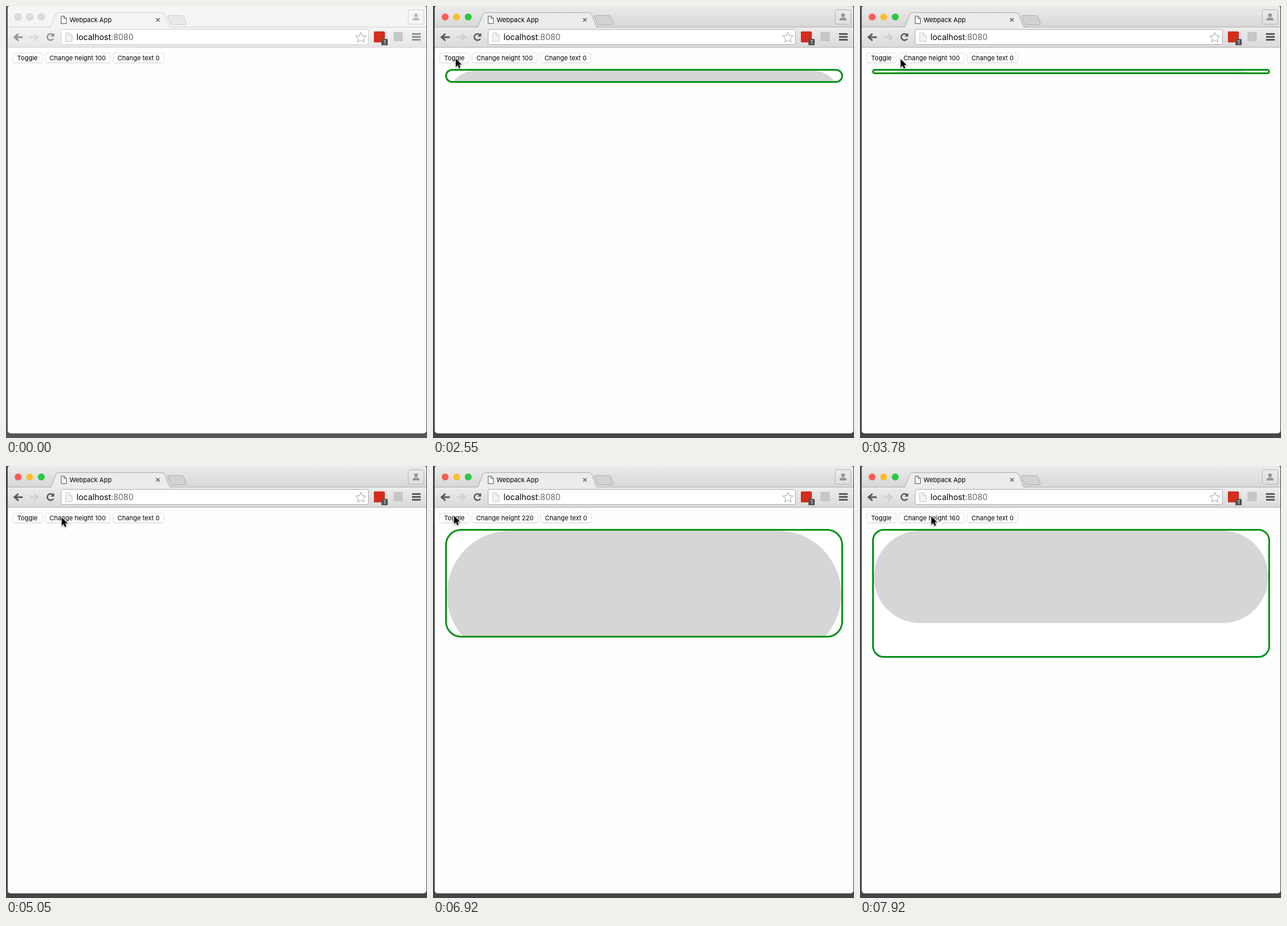
Animation, 729 px wide and 748 px high, one loop 8000 ms. Source, as an HTML page:

```html
<!DOCTYPE html>
<html lang="en">
<head>
<meta charset="utf-8">
<title>Collapse demo</title>
<style>
  html, body { margin: 0; width: 100%; height: 100%; overflow: hidden; background: #464547; }
  body { position: relative; font: 11px Inter, sans-serif; --ink: #5a5a5a; --line: #adadad; --top: #ebebeb; --bottom: #d7d7d7; --bar: #ececec; --barEnd: #dadada; --newTab: #d2d2d2; }
  body.idle { background: #575557; --ink: #919191; --line: #d0d0d0; --top: #f6f6f6; --bottom: #f4f4f4; --bar: #f4f4f4; --barEnd: #e6e6e6; --newTab: #e8e8e8; }
  svg { position: absolute; left: 0; top: 0; }
  .ink { fill: var(--ink); }
  .line { stroke: var(--line); }
  .idle .light { fill: #dcdcdc; stroke: #cecece; }
  .idle .faint { opacity: .6; }
  #buttons { position: absolute; left: 11px; top: 81px; display: flex; gap: 4px; }
  #buttons div { box-sizing: border-box; height: 18px; border: 1px solid #e2e2e2; border-bottom-color: #cfcfcf; border-radius: 4px; background: #fff; color: #000; line-height: 16px; text-align: center; white-space: nowrap; }
  #buttons .pressed { border-color: #3f8ff2 #3f8ff2 #1a62d8; background: linear-gradient(#62aefa, #1474f6); color: #fff; }
  #box { position: absolute; left: 21px; top: 109px; width: 683px; border: 3px solid #059118; background: #fff; overflow: hidden; }
  #fill { background: #d6d6d6; border-radius: 999px; }
</style>
</head>
<body>
<svg width="729" height="748" fill="none">
  <defs>
    <linearGradient id="title" x2="0" y2="1"><stop stop-color="var(--top)"/><stop offset="1" stop-color="var(--bottom)"/></linearGradient>
    <linearGradient id="bar" x2="0" y2="1"><stop stop-color="var(--bar)"/><stop offset="1" stop-color="var(--barEnd)"/></linearGradient>
  </defs>
  <rect x="3" width="725" height="740" rx="5" fill="#fefefe"/>
  <path d="M3 37V4Q3 0 7 0H724Q728 0 728 4V37Z" fill="url(#title)"/>
  <path d="M3 37H728V71H3Z" fill="url(#bar)"/>
  <path class="line" d="M3 71.5H728M3 36.5H728"/>
  <path d="M75 38Q79 37 80 33L87 15Q88 11.500 91 11.500H270Q273 11.500 274 15L281 33Q282 37 286 38Z" fill="var(--bar)"/>
  <path class="line" d="M74 36.500Q78 36 79 33L86 15Q87.500 11.500 91 11.500H270Q274 11.500 275 15L282 33Q283 36.500 287 36.500"/>
  <path class="line" d="M282 16.500H303Q307 16.500 308 19L312 29Q313 32.500 309 32.500H289Q285 32.500 284 29L280 19Q279 16.500 282 16.500Z" fill="var(--newTab)"/>
  <circle class="light" cx="21" cy="19" r="6" fill="#fc5b54"/>
  <circle class="light" cx="41" cy="19" r="6" fill="#fdbd2e"/>
  <circle class="light" cx="61" cy="19" r="6" fill="#2bc93f"/>
  <path d="M95.500 17.500H101L104.500 21V30.500H95.500ZM100.500 17.500V21.500H104.500" fill="#fff" stroke="#555"/>
  <text x="110" y="28" fill="#000">Webpack App</text>
  <path d="M260 21L266 27M266 21L260 27" stroke="#666" stroke-width="1.700"/>
  <g class="faint">
    <rect x="696.500" y="6.500" width="27" height="25" rx="3" stroke="#b4b4b4" fill="#fff" fill-opacity=".15"/>
    <circle cx="710" cy="16" r="3.300" fill="#969696"/>
    <path d="M704 25V23Q705 20 710 20T716 23V25Z" fill="#969696"/>
  </g>
  <path class="ink" d="M12.500 54L20.500 47L22.500 49L18.700 52.400H29V55.600H18.700L22.500 59L20.500 61Z"/>
  <path d="M57.500 54L49.500 47L47.500 49L51.300 52.400H41V55.600H51.300L47.500 59L49.500 61Z" fill="#cfcfcf" class="faint"/>
  <path d="M81.300 50A5.600 5.600 0 1 0 82 56.500" stroke="var(--ink)" stroke-width="2.500"/>
  <path class="ink" d="M83.500 46.500V53H77Z"/>
  <rect class="line" x="95.500" y="40.500" width="532" height="26" rx="2" fill="#fff"/>
  <path d="M103.500 46.500H110L114.500 51V61.500H103.500ZM109.500 46.500V51.500H114.500" fill="#f3f3f3" stroke="#c6c6c6"/>
  <text x="122" y="59" font-size="14" fill="#000">localhost<tspan fill="#666">:8080</tspan></text>
  <path d="M614.500 45.500L617 51.500L623.500 52L618.500 56.200L620.100 62.500L614.500 59.100L608.900 62.500L610.500 56.200L605.500 52L612 51.500Z" fill="#fff" stroke="#a0a0a0"/>
  <rect x="637" y="44" width="19" height="19" rx="1.500" fill="#d42d1c"/>
  <rect x="650" y="57" width="11" height="11" rx="1.500" fill="#555"/>
  <text x="655.500" y="66" font-size="9" fill="#fff" text-anchor="middle">1</text>
  <rect x="671" y="45" width="16" height="16" fill="#c6c6c6"/>
  <path d="M703 48.500H718M703 53.500H718M703 58.500H718" stroke="var(--ink)" stroke-width="3"/>
</svg>
<div id="buttons">
  <div style="width:52px">Toggle</div>
  <div></div>
  <div style="width:89px">Change text 0</div>
</div>
<div id="box"><div id="fill"></div></div>
<svg id="cursor" width="20" height="24" style="overflow:visible">
  <path d="M0 0V14.500L3.300 11.500L5.500 16.500L8 15.400L5.900 10.600H10.300Z" stroke="#fff" stroke-width="1.600" paint-order="stroke" style="filter:drop-shadow(0 1px 1px #0006)"/>
</svg>
<script>
const LOOP = 8000, REFRESH = 100, PRESS = 170, SETTLE = 1700;
const [box, fill, cursor] = ['box', 'fill', 'cursor'].map(id => document.getElementById(id));
const [toggle, resize] = document.getElementById('buttons').children;

const moves = [
  { start: 620, end: 1160, x: 39.5, y: 91 },
  { start: 3310, end: 3960, x: 88.5, y: 92 },
  { start: 4445, end: 4670, x: 96.5, y: 89 },
  { start: 6025, end: 6325, x: 36.5, y: 86 },
  { start: 7040, end: 7490, x: 123.5, y: 87 }
];

// Each click acts on release
const clicks = [
  { button: toggle, up: 2460 },
  { button: toggle, up: 3310 },
  { button: resize, up: 5620, content: 220 },
  { button: toggle, up: 6676 },
  { button: resize, up: 7893, content: 160 }
];

function cursorAt(t) {
  let x = 140, y = -12;
  for (const move of moves) {
    const k = Math.min(1, Math.max(0, (t - move.start) / (move.end - move.start)));
    x += (move.x - x) * k;
    y += (move.y - y) * k;
  }
  return [x, y];
}

// Critically damped spring
function spring(from, to, ms) {
  const x = 13.04 * ms / 1000;
  return Math.round(to + (from - to) * (1 + x) * Math.exp(-x));
}

function boxAt(t) {
  let open = false, content = 100, from = 0, to = 0, start = -LOOP;
  for (const click of clicks.filter(c => c.up <= t)) {
    if (click.button === toggle) open = !open;
    else content = click.content;
    const target = open ? content : 0;
    if (target !== to) [from, to, start] = [to, target, click.up];
  }
  return { content, height: spring(from, to, t - start), hidden: !open && t - start > SETTLE };
}

function draw() {
  const now = performance.now() % LOOP;
  const t = Math.max(0, Math.floor((now - 20) / REFRESH) * REFRESH + 20);
  const { content, height, hidden } = boxAt(t);
  const [x, y] = cursorAt(t);

  document.body.className = t < 1250 ? 'idle' : '';
  cursor.style.visibility = t < 390 ? 'hidden' : 'visible';
  cursor.style.transform = `translate(${x}px, ${y}px)`;
  for (const button of [toggle, resize])
    button.className = clicks.some(c => c.button === button && t < c.up && t >= c.up - PRESS) ? 'pressed' : '';
  resize.textContent = 'Change height ' + content;
  resize.style.width = (content === 220 ? 115 : 114) + 'px';

  box.hidden = hidden;
  box.style.height = height + 'px';
  box.style.borderRadius = content / 8 + 'px';
  fill.style.height = content + 'px';
  requestAnimationFrame(draw);
}
draw();
</script>
</body>
</html>
```
